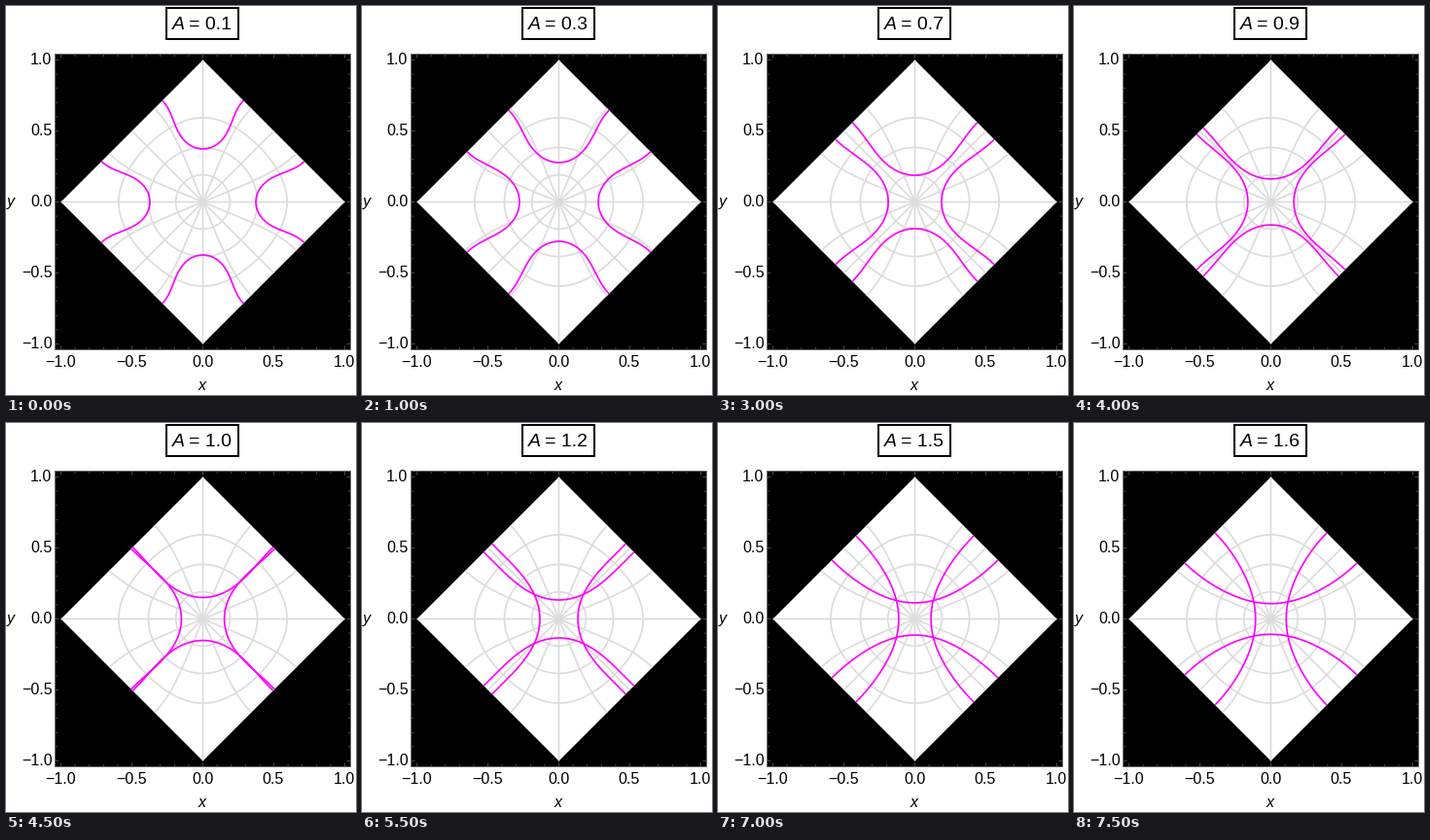
Write a matplotlib script that moves like this. It is 360 px wide and 400 px high and loops after 8 s.

```python
import numpy as np
import matplotlib.pyplot as plt
from matplotlib.animation import FuncAnimation
from matplotlib.patches import Polygon, Rectangle

W, H, DPI = 360, 400, 100
CX, CY, UNIT, HALF = 202.5, 201.5, 146, 152
FRAMES, STEP = 16, 500
PX = 72 / DPI

plt.rcParams["font.family"] = "Liberation Sans"
fig = plt.figure(figsize=(W / DPI, H / DPI), dpi=DPI, facecolor="white")
ax = fig.add_axes([0, 0, 1, 1])
ax.set(xlim=(0, W), ylim=(H, 0))
ax.axis("off")

# Conformal map of the unit disk onto the diamond |x| + |y| <= 1
nodes, weights = np.polynomial.legendre.leggauss(60)
t = (nodes + 1) / 2
S, DS = 1 - (1 - t) ** 2, weights * (1 - t)
K = np.sum(DS / np.sqrt(1 - S ** 4))


def diamond(z):
    z = np.asarray(z, complex)
    return z * np.sum(DS / np.sqrt(1 - (z[:, None] * S) ** 4), axis=1) / K


def to_px(w):
    return CX + UNIT * w.real, CY - UNIT * w.imag


def line(x, y, color, width, **kw):
    return ax.plot(x, y, color=color, lw=width * PX, snap=False,
                   solid_capstyle="butt", **kw)[0]


def label(x, y, s, size=16, **kw):
    return ax.text(x, y, s, fontsize=size * PX, color="black", **kw)


def branch(a):
    """Right-hand curve: a circle in the plane of (z + 1/z) / 2."""
    edge = np.sqrt(0.97 - 0.455 * a)
    apex = 1.13 + 1.40 * a + 0.09 * a * a
    tau = np.linspace(-np.pi, np.pi, 241)
    u = (apex + edge) / 2 + (apex - edge) / 2 * np.exp(1j * tau)
    return diamond(u - np.sqrt(u - 1) * np.sqrt(u + 1))


# Plot area and polar mesh
ax.add_patch(Rectangle((CX - HALF, CY - HALF), 2 * HALF, 2 * HALF,
                       fc="black", ec="none", snap=False))
corners = np.array([1, 1j, -1, -1j])
ax.add_patch(Polygon(np.column_stack(to_px(corners)), fc="white", ec="none"))

MESH = "#dcdcdc"
turn = np.exp(1j * np.linspace(0, 2 * np.pi, 241))
for radius in (0.25, 0.5, 0.75):
    line(*to_px(diamond(radius * turn)), MESH, 1.7)
spoke = diamond(np.linspace(0, 1, 80) * np.exp(1j * np.pi / 8))
for k in range(4):
    quarter = 1j ** k
    for ray in (np.array([0, 1]), np.array([0, 0.5 + 0.5j]),
                spoke, 1j * spoke.conj()):
        line(*to_px(ray * quarter), MESH, 1.7)

# Frame ticks and labels
for k in range(-10, 11):
    d = UNIT * k / 10
    size = 4 if k % 5 == 0 else 2.5
    for side in (-1, 1):
        end = side * HALF
        tip = end - side * size
        line([CX + d] * 2, [CY + end, CY + tip], "#666666", 0.7)
        line([CX + end, CX + tip], [CY + d] * 2, "#666666", 0.7)
    if k % 5 == 0:
        s = f"{k / 10:.1f}".replace("-", "\u2212")
        label(CX + d - 0.5, 371, s, ha="center")
        label(47.5, CY - d + 4.8, s, ha="right")
ax.add_patch(Rectangle((CX - HALF, CY - HALF), 2 * HALF, 2 * HALF,
                       fc="none", ec="#666666", lw=PX, snap=False))
label(202, 394.8, "x", style="italic", ha="center")
label(4.5, 205.8, "y", style="italic", ha="center")

# Title box
ax.add_patch(Rectangle((165, 2), 74, 32, fc="white", ec="black", lw=2 * PX))
label(171, 24, "A", 19.5, style="italic")
title = label(188.5, 24, "", 19.5)

curves = [line([], [], "#ff00ff", 1.7, zorder=5) for _ in range(4)]


def update(i):
    a = (i + 1) / 10
    title.set_text(f"= {a:.1f}")
    w = branch(a)
    for k, curve in enumerate(curves):
        curve.set_data(*to_px(w * 1j ** k))
    return [title, *curves]


anim = FuncAnimation(fig, update, frames=FRAMES, interval=STEP,
                     repeat=True, repeat_delay=0, blit=False)
plt.show()
```
